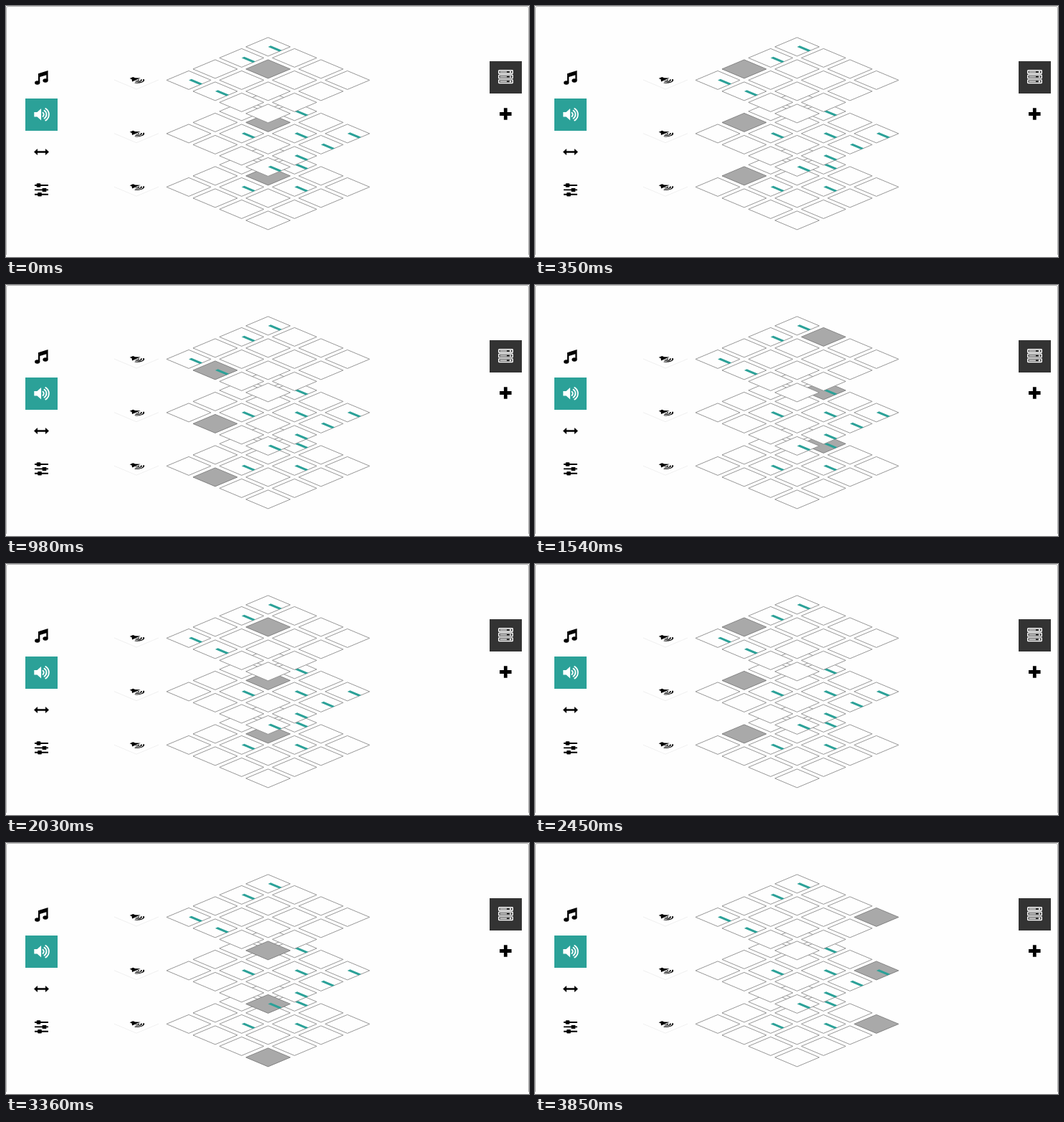
An HTML page that plays this animation: 730 px wide and 350 px high, repeating every 3920 ms.

```html
<!DOCTYPE html>
<html lang="en">
<head>
<meta charset="utf-8">
<title>Layered sequencer</title>
<style>
  html, body { margin: 0; width: 100%; height: 100%; overflow: hidden; background: #fefefe; }
  svg { display: block; width: 730px; height: 350px; }
  .tile { fill: #fefefe; stroke: #8c8c8c; stroke-width: .9; }
  .tile.on { fill: #a9a9a9; stroke: #7c7c7c; }
  .bar { fill: #2ba198; }
  .line { fill: none; stroke: currentColor; }
</style>
</head>
<body>
<svg viewBox="0 0 730 350">
  <defs>
    <g id="speaker">
      <path fill="currentColor" d="M-10-3.3h4.2l5.6-5V8.3l-5.6-5H-10z"/>
      <path class="line" stroke-width="1.9" stroke-linecap="round"
            d="M2.2-2.6a3.3 3.3 0 0 1 0 5.2M4.2-5.5a6.6 6.6 0 0 1 0 11M6-8.3a9.8 9.8 0 0 1 0 16.6"/>
    </g>
    <g id="unit">
      <rect class="line" x=".7" y=".7" width="19.6" height="4.6" rx=".7" stroke-width="1.4"/>
      <path class="line" d="M2.5 3H12" stroke-width="1.3"/>
      <circle cx="17" cy="3" r="1.2" fill="currentColor"/>
    </g>
    <g id="mute">
      <path class="line" color="#f0f0f0" d="M-31 0L0 13 31 0"/>
      <use href="#speaker" transform="matrix(.7 .295 -.7 .295 0 0)"/>
    </g>
  </defs>

  <path class="line" color="#a0a0a0" d="M.5 347V3Q.5.5 3 .5H727Q729.5.5 729.5 3V347" stroke-width=".8"/>

  <!-- left menu -->
  <path d="M45 94.2L58.6 90V104h-2.3V96.2L47.3 99v8H45z"/>
  <ellipse cx="43.7" cy="107" rx="3.6" ry="2.8"/>
  <ellipse cx="55" cy="104" rx="3.6" ry="2.8"/>

  <rect x="27" y="129" width="45" height="45" fill="#2ba198"/>
  <use href="#speaker" x="49.3" y="151.3" color="#fff"/>

  <path d="M39 203.5l5-4.6v3.3h11v-3.3l5 4.6-5 4.6v-3.3H44v3.3z"/>

  <path class="line" d="M40 250H59M40 256.4H59M40 262.8H59" stroke-width="1.9"/>
  <path class="line" d="M45.5 247.5v5M53.5 253.9v5M47 260.3v5" stroke="#fefefe" stroke-width="5.6"/>
  <path class="line" d="M45.5 247.5v5M53.5 253.9v5M47 260.3v5" stroke-width="3.6"/>

  <!-- right menu -->
  <rect x="675" y="77" width="45" height="45" fill="#333"/>
  <g color="#fff">
    <use href="#unit" x="687" y="89"/>
    <use href="#unit" x="687" y="95.6"/>
    <use href="#unit" x="687" y="102.2"/>
  </g>
  <path class="line" d="M689 150.5H705.6M697.3 142.2V158.8" stroke-width="4.8"/>

  <use href="#mute" x="182" y="103"/>
  <use href="#mute" x="182" y="177.7"/>
  <use href="#mute" x="182" y="252.2"/>

  <g id="board"></g>
</svg>
<script>
  const LOOP = 3920, TICK = 70, STEP_TICKS = 1.875, PHASE = .45;
  const SIZE = 4, CELLS = SIZE * SIZE, FIRST = 5;
  const HALF_W = 31, HALF_H = 13;
  // Active cells per layer, top layer first; index = column + 4 * row.
  const notes = [[0, 4, 12, 13], [1, 9, 6, 3, 7, 11, 15], [1, 9, 6]];
  const board = document.getElementById('board');
  const cells = Array.from({ length: CELLS }, () => []);

  // Projects tile coordinates, with the tile spanning -0.5 to 0.5.
  const project = (p, q) => [(p - q) * HALF_W, (p + q) * HALF_H];

  function addQuad(className, cx, cy, p0, q0, p1, q1) {
    const quad = document.createElementNS('http://www.w3.org/2000/svg', 'polygon');
    const corners = [[p0, q0], [p1, q0], [p1, q1], [p0, q1]].map(([p, q]) => {
      const [x, y] = project(p, q);
      return [cx + x, cy + y];
    });
    quad.setAttribute('points', corners.join(' '));
    quad.setAttribute('class', className);
    board.append(quad);
    return quad;
  }

  for (let layer = notes.length - 1; layer >= 0; layer--) {
    for (let i = 0; i < CELLS; i++) {
      const col = i % SIZE, row = Math.floor(i / SIZE);
      const x = 365.8 + 36.9 * (col - row);
      const y = 56.9 + 15.5 * (col + row) + 74.5 * layer;
      cells[i].push(addQuad('tile', x, y, -.5, -.5, .5, .5));
      if (notes[layer].includes(i)) addQuad('bar', x, y, 0, -.12, .5, 0);
    }
  }

  let current = -1;
  const mark = (i, on) => cells[i]?.forEach(tile => tile.classList.toggle('on', on));

  function render(now) {
    const tick = Math.floor((now % LOOP) / TICK);
    const step = Math.floor((tick - PHASE) / STEP_TICKS) + 1;
    const next = (FIRST + step) % CELLS;
    if (next !== current) {
      mark(current, false);
      mark(next, true);
      current = next;
    }
  }

  let start;
  function loop(now) {
    start ??= now;
    render(now - start);
    requestAnimationFrame(loop);
  }
  render(0);
  requestAnimationFrame(loop);
</script>
</body>
</html>
```
